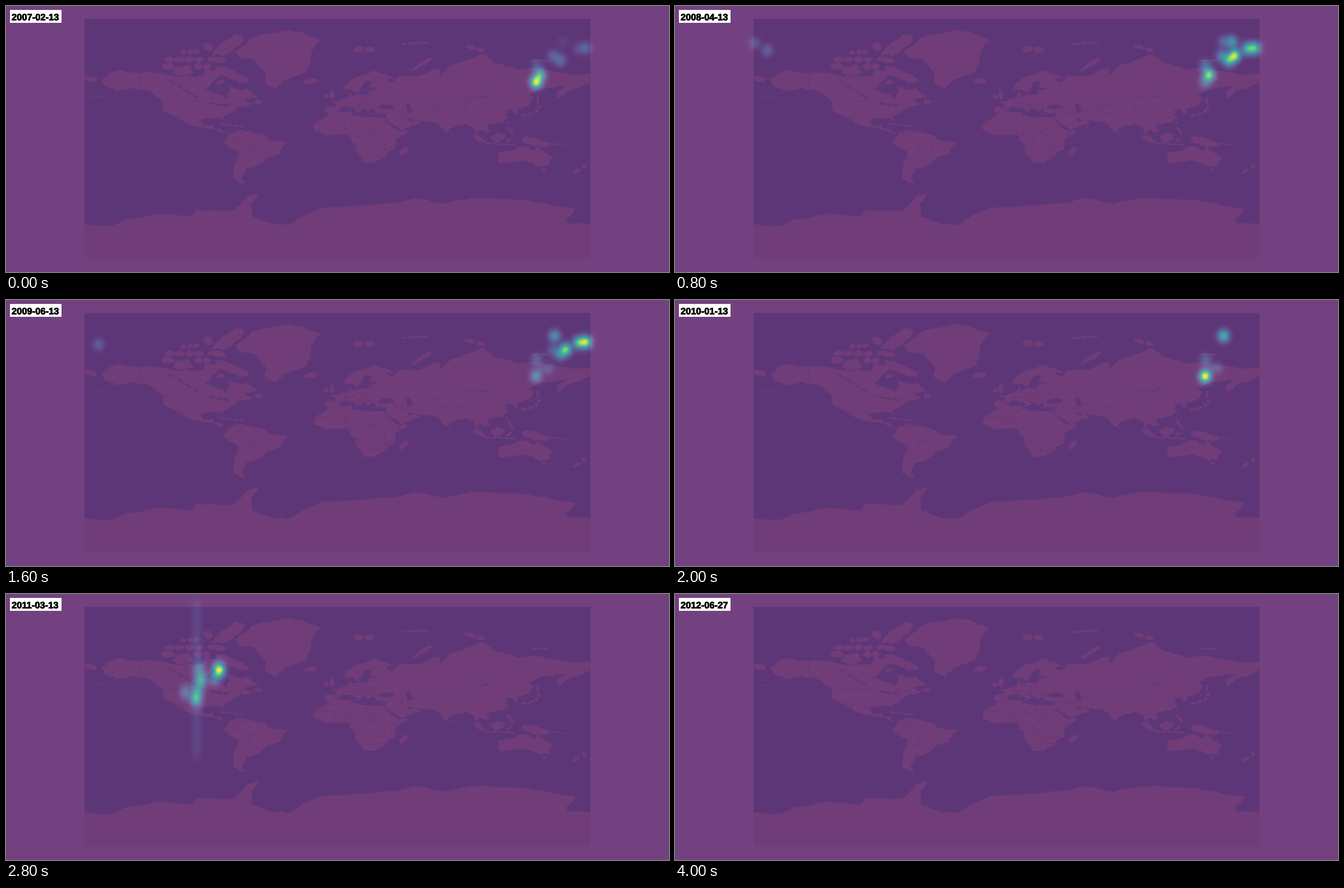
A matplotlib script for the animation above (4400 ms loop, 1182 by 474 pixels).

```python
import numpy as np
import matplotlib.pyplot as plt
from matplotlib.animation import FuncAnimation
from matplotlib.collections import LineCollection
from matplotlib.patches import Polygon, Rectangle
from matplotlib.patheffects import withStroke

W, H, DPI = 1182, 474, 100
LEFT, TOP, MAP_W, MAP_H = 140, 23, 902, 427
WATER, LAND, BORDER = "#aad3df", "#f2efe9", "#c4c4c6"
PX = 72 / DPI
rng = np.random.default_rng(4)

fig = plt.figure(figsize=(W / DPI, H / DPI), dpi=DPI, facecolor="white")
ax = fig.add_axes([0, 0, 1, 1])
ax.axis("off")
sea = ax.add_patch(Rectangle((LEFT, TOP), MAP_W, MAP_H, fc=WATER, lw=0))


def project(nums):
    """Mercator, squeezed to the map's height."""
    lon, lat = np.reshape(nums, (-1, 2)).T
    y = np.log(np.tan(np.pi / 4 + np.radians(lat) / 2))
    return np.column_stack([LEFT + (lon + 180) / 360 * MAP_W,
                            TOP + MAP_H / 2 - y * MAP_H / (2 * np.pi)])


def rough(p):
    """Turn key points into a ragged coast by shifting midpoints."""
    for _ in range(3):
        d = np.roll(p, -1, axis=0) - p
        size = np.hypot(d[:, 0], d[:, 1]) + 1e-9
        shift = rng.uniform(-1, 1, len(p)) * np.minimum(.15 * size, 1.4)
        normal = np.column_stack([-d[:, 1], d[:, 0]]) / size[:, None]
        mid = p + d / 2 + normal * shift[:, None]
        p = np.stack([p, mid], axis=1).reshape(-1, 2)
    return p


def shape(points, color=LAND):
    patch = ax.add_patch(Polygon(rough(points), fc=color, lw=0))
    patch.set_clip_path(sea)
    return patch


def land(*nums):
    return shape(project(nums))


def chain(lon0, lat0, lon1, lat1, count, half, color=LAND):
    """Irregular ovals in a row; half is half their thickness in pixels."""
    a, b = project([lon0, lat0, lon1, lat1])
    step = (b - a) / count
    length = np.hypot(*step)
    along = step / length
    across = np.array([-along[1], along[0]])
    t = np.linspace(0, 2 * np.pi, 12, endpoint=False)[:, None]
    oval = .47 * length * np.cos(t) * along + half * np.sin(t) * across
    for k in range(count):
        shape(a + step * (k + .5) + oval * rng.uniform(.8, 1.2, t.shape), color)


def borders(patch, lon0, lat0, lon1, lat1, cell):
    """A shaken brick pattern of frontiers, kept inside one land mass."""
    (x0, y1), (x1, y0) = project([lon0, lat0, lon1, lat1])
    grid = np.stack(np.meshgrid(np.arange(x0, x1, cell), np.arange(y0, y1, cell)), -1)
    grid += rng.uniform(-.4, .4, grid.shape) * cell
    rows, cols = grid.shape[:2]
    lines = list(grid) + [grid[r:r + 2, c] for r in range(rows - 1)
                          for c in range(cols) if (r + c) % 2]
    frontier = ax.add_collection(LineCollection(lines, colors=BORDER, linewidths=.6 * PX))
    frontier.set_clip_path(patch)


north_america = land(
    -168, 65.6, -163, 69.5, -156, 71.3, -141, 69.6, -128, 70, -115, 68, -96, 67.8,
    -94, 71.8, -82, 69.5, -86, 66.5, -94.5, 59, -82.3, 55, -79.5, 51.3, -77, 56.5,
    -78, 62.4, -67.5, 58.3, -64.6, 60.3, -56, 52.5, -66.5, 50.2, -65, 49, -60.5, 46,
    -65.5, 43.5, -70, 43, -76, 36, -81.2, 31, -80.3, 25.3, -83, 29.7, -89.5, 29.5,
    -97.3, 27, -96, 19, -91.5, 18.6, -88, 21.5, -88.5, 15.8, -83.3, 14.5, -81, 8.9,
    -77.3, 8.6, -80, 7.4, -87.6, 13, -95, 16, -105.5, 20.5, -112.5, 29.8,
    -109.5, 23.3, -117.2, 32.8, -124, 40, -124, 48, -133.5, 58, -146, 60.5,
    -153, 58.5, -164, 54.6, -157.5, 58.6, -166, 62)
land(-73, 78.3, -60, 82, -38, 83.4, -24, 82.8, -12, 81.4, -19, 78.5, -19.5, 74,
     -22, 70.4, -38, 65.7, -43, 60.1, -51.5, 64, -51, 69.5, -55, 72.5, -59, 75.6,
     -68.5, 76)
south_america = land(
    -77.3, 8.6, -72, 12, -62, 10.7, -51, 4, -50, 0, -35.3, -5.5, -39, -13, -41, -22,
    -48.5, -26, -54, -34.5, -58, -38.3, -65, -41, -68.5, -51, -65.5, -54.8,
    -69, -55.5, -74.5, -51, -73.5, -38, -70.3, -18.5, -76, -14, -81.2, -6, -77.5, 4)
africa = land(
    -6, 35.8, 10, 37.2, 11, 33.5, 20, 31, 32.5, 31.2, 37.3, 20.8, 43.3, 12, 51.2, 11.9,
    41, -2, 40.6, -15, 35, -20, 35.3, -24, 27, -33.7, 19, -34.5, 14.5, -22.5,
    11.8, -17, 13.5, -10, 9, -1, 9.3, 4, 4, 6.4, -7.5, 4.4, -16.5, 12.4, -17, 21,
    -9.8, 30)
europe = land(
    -5.6, 36, -9.3, 38, -8.8, 43.2, -1.6, 43.4, -1.5, 46.5, -4.7, 48.4, 1.6, 50.5,
    8, 53.7, 9, 57.5, 11, 54, 21, 55, 23, 59, 29.5, 60, 22.5, 60.5, 25, 65.3, 21, 65,
    17.3, 61, 15, 55.8, 11, 59, 5.5, 58.7, 5, 62, 14, 67.8, 25.7, 71, 41, 66.8,
    33, 66.7, 38, 64, 44, 68, 68, 68.6, 68, 44, 62, 38, 36, 36.5, 27.5, 36.7,
    26.3, 40.5, 23.5, 40, 22.7, 36.6, 19.4, 41.8, 13, 45.3, 18.4, 40, 16, 38,
    10.5, 43, 3.5, 43.3, -.3, 38.5, -2, 36.8)
asia = land(
    60, 68.7, 68, 71.5, 73, 72, 73, 68.5, 80, 73.3, 104, 77.6, 113, 74, 129, 71.5,
    140, 72.5, 160, 69.8, 181, 68.9, 181, 65, 170, 60, 163, 58, 156.7, 51.2, 156, 57,
    162, 61.7, 143, 59.3, 135.3, 54.8, 140.5, 52, 135.5, 44, 128, 40, 129, 35.5,
    126.3, 34.8, 124.5, 39.5, 118, 39, 121, 37, 119.3, 35, 121.8, 30.5, 116.8, 23.3,
    108, 21.6, 106, 18.5, 109, 12, 105, 9, 100.5, 13.3, 99.5, 10, 103.7, 1.5, 98.5, 8,
    97.5, 16.5, 91, 22.3, 80.2, 15.5, 77.5, 8.1, 72.7, 20.5, 66.5, 25.4, 57, 26,
    48.5, 30, 51.5, 25, 56.3, 26, 59.5, 22.5, 45, 12.9, 35, 28.5, 33, 29, 34.4, 31.3,
    36, 37, 50, 42, 60, 50)
land(114, -22, 122, -18, 130.5, -12, 136.5, -12, 136, -15, 140.5, -17.5, 142.5, -11,
     146, -18.5, 153.3, -27, 150, -37.5, 144, -38.5, 137.5, -33.5, 131, -31.5,
     118, -35, 115, -34)
# The southern ice coast is set in pixels
shape(np.reshape([
    130, 388, 180, 393, 215, 380, 275, 370, 332, 374, 338, 363, 405, 365, 433, 338,
    450, 334, 438, 350, 438, 374, 472, 388, 503, 390, 530, 373, 560, 360, 690, 352,
    728, 342, 782, 353, 830, 342, 930, 346, 1017, 362, 999, 379, 1002, 388, 1050, 388,
    1050, 460, 130, 460], (-1, 2)).astype(float))

# Arctic islands
chain(-118, 71, -102, 71, 1, 9)
chain(-125, 73, -116, 73, 1, 7)
chain(-89, 72.5, -63, 65, 1, 9)
chain(-89, 77.3, -64, 82.6, 1, 12)
chain(-96, 80.5, -88, 79, 1, 7)
chain(-93, 76, -79, 75.3, 1, 5)
chain(-123, 75.7, -95, 75.7, 4, 5)
chain(-112, 78, -98, 78.5, 3, 4)
chain(-102, 73, -90, 73, 2, 6)
chain(-87, 64, -80, 65, 1, 3.5)
chain(11, 79, 27, 79, 2, 6)
chain(46, 80.5, 65, 80.8, 5, 2)
chain(53, 71, 68, 76.7, 1, 4)
chain(91, 80, 105, 78.5, 2, 4)
chain(137, 75.3, 150, 75.3, 2, 2)
# Islands of the other seas
chain(-24.5, 65, -13.5, 65, 1, 4.5)
chain(-181, 67.5, -171, 65.5, 1, 5)
chain(-179, 51.5, -165, 54, 6, .8)
chain(-59, 48.5, -53, 48.5, 1, 4)
chain(-85, 22, -74, 20, 1, 1.3)
chain(-74, 19, -66, 18.3, 2, 1.5)
chain(-61, -51.8, -58, -51.8, 1, 1)
chain(-4, 50.3, -4, 58.6, 1, 5)
chain(-10, 53.3, -6, 53.3, 1, 4)
chain(9, 42.8, 9, 39, 2, 1.4)
chain(12.5, 37.8, 15.7, 37.5, 1, 1.5)
chain(24, 35.2, 34, 35.2, 2, .8)
chain(44, -24, 49.5, -13, 1, 5)
chain(80.7, 9.5, 80.7, 6, 1, 2)
chain(142.5, 54, 142.5, 46, 1, 2)
chain(144, 45, 141, 36, 2, 3)
chain(140, 36, 130, 32, 2, 2)
chain(121, 25, 121, 22, 1, 1.5)
chain(121, 18.5, 125, 6, 4, 3)
chain(95.5, 5.5, 106, -5.7, 1, 4.5)
chain(105, -7, 127, -9, 5, 1.5)
chain(109, 0, 119, 4, 1, 8)
chain(120, -5, 124, 1, 1, 2.5)
chain(131, -1, 151, -9.5, 1, 7)
chain(148.5, -5.8, 162, -10, 4, 1.2)
chain(145, -42, 148.3, -42, 1, 2)
chain(173.5, -35, 177, -41, 1, 3)
chain(173, -41, 167, -46.5, 1, 2.5)
# Inland water
chain(28, 43, 41.5, 43, 1, 4, WATER)
chain(52, 37, 49.5, 46.5, 1, 5, WATER)
chain(-91, 47.5, -77, 43.7, 3, 2, WATER)
chain(104, 52, 109.5, 55.5, 1, 1.2, WATER)
chain(-98, 51, -120, 66, 4, 1.2, WATER)

borders(africa, -18, -30, 52, 34, 19)
borders(south_america, -80, -38, -48, 8, 22)
borders(europe, -4, 38, 30, 58, 13)
borders(asia, 38, 14, 110, 50, 26)
for line in ([-141, 70, -141, 60, -130, 55], [-124, 49, -95, 49, -83, 45, -68, 47],
             [-117, 32.5, -106, 31.5, -97, 26]):
    ax.plot(*project(line).T, color=BORDER, lw=.7 * PX)[0].set_clip_path(north_america)

# Places where density gathers, in pixels
EAST = [(945, 136), (952, 123), (967, 122), (946, 106), (975, 89), (988, 97), (998, 88),
        (978, 64), (993, 64), (1021, 76), (1034, 75), (165, 79), (142, 66)]
WEST = [(380, 135), (372, 150), (348, 153), (345, 133), (320, 175), (342, 171), (339, 187)]
COLUMN = [(340, y) for y in range(20, 300, 20)]

# How strong each place is at the key steps; other steps lie between
EAST_KEYS = {0: [.9, .55, 0, .12, .16, .22, 0, 0, .05, .1, .18, 0, 0],
             2: [.25, .8, 0, .25, .35, .6, .9, .2, .42, .6, .65, .18, .14],
             4: [.28, .05, .1, .14, .12, .25, .58, .3, 0, .5, .65, .12, 0],
             5: [1, .1, .15, .18, 0, 0, 0, .58, 0, 0, 0, 0, 0],
             7: [0] * 13}
WEST_KEYS = {5: [0] * 7, 7: [1, .3, .5, .28, .28, .3, .55],
             8: [.14, 0, .2, .05, 0, .35, 1], 10: [0] * 7}
COLUMN_KEYS = {5: [0], 7: [.045], 8: [0]}
STEPS = 11


def spot(place, sy):
    x, y = place
    return np.outer(np.exp(-((np.arange(H) + .5 - y) / sy) ** 2 / 2),
                    np.exp(-((np.arange(W) + .5 - x) / 7) ** 2 / 2))


east = [spot(p, 7.4) for p in EAST]
west = [spot(p, 8.8) for p in WEST]
column = [sum(spot(p, 12) for p in COLUMN)]


def blend(spots, keys, i):
    strengths = np.array(list(keys.values()))
    return sum(np.interp(i, list(keys), w) * s for w, s in zip(strengths.T, spots))


def density(i):
    total = (blend(east, EAST_KEYS, i) + blend(west, WEST_KEYS, i)
             + blend(column, COLUMN_KEYS, i))
    return total / max(total.max(), 1e-9)


def date(i):
    if i == STEPS - 1:
        return "2012-06-27"
    year, month = divmod(1 + 7 * i, 12)
    return f"{2007 + year}-{month + 1:02}-13"


heat = ax.imshow(np.zeros((H, W)), cmap="viridis", vmin=0, vmax=1, alpha=.75,
                 extent=(0, W, H, 0), aspect="auto", interpolation="nearest", zorder=5)
ax.add_patch(Rectangle((7, 7), 92, 23, fc="white", lw=0, zorder=6))
label = ax.text(10, 25.5, "", family="Liberation Sans", weight="bold", size=16.5 * PX,
                va="baseline", zorder=7,
                path_effects=[withStroke(linewidth=.8 * PX, foreground="black")])
ax.set(xlim=(0, W), ylim=(H, 0))


def update(i):
    heat.set_data(density(i))
    label.set_text(date(i))
    return heat, label


anim = FuncAnimation(fig, update, frames=STEPS, interval=400, repeat=True)
plt.show()
```
